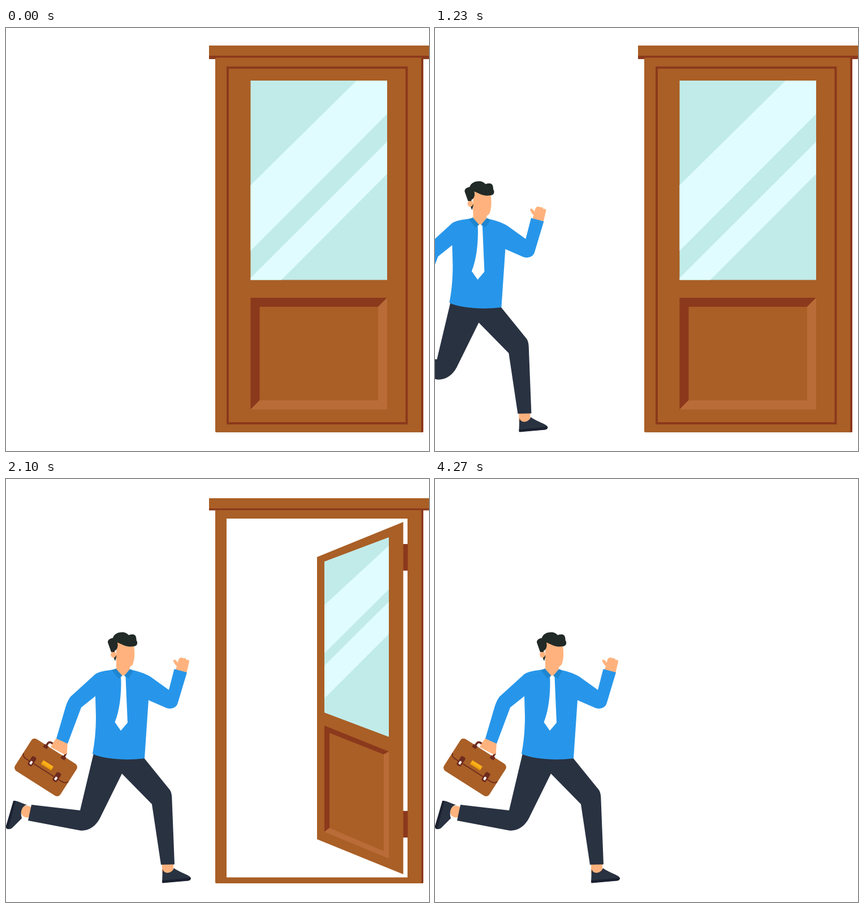
Write an HTML page that moves like this. It is 748 px wide and 748 px high and loops after 4310 ms.

```html
<!DOCTYPE html>
<html lang="en">
<head>
<meta charset="utf-8">
<title>Door to the future</title>
<style>
  html, body { margin: 0; width: 100%; height: 100%; overflow: hidden; background: #fff; }
  svg { display: block; width: 100vw; height: 100vh; }
  .wood { fill: #a95f26; }
  .dark { fill: #8b391c; }
  .light { fill: #b96c38; }
  .glass { fill: #c1ebe9; }
  .shine { fill: #e0fcfe; }
  .blue { fill: #2796ea; }
  .collar { fill: #1f86d0; }
  .skin { fill: #ffb27d; }
  .hair { fill: #212a26; }
  .navy { fill: #293241; }
  .sole { fill: #1b2130; }
  .strap { fill: #6e2b1f; }
  .line { fill: none; stroke: #6e2b1f; }
  text { font: 700 14px "Open Sans", "Noto Sans", sans-serif; fill: #fff; text-anchor: middle; }
</style>
</head>
<body>
<svg viewBox="0 0 748 748">
  <g id="closed">
    <path class="wood" d="M359 31H760V50H359Z"/>
    <path class="dark" d="M359 49H760V55H359Z"/>
    <rect class="wood" x="370" y="52.500" width="368" height="662.500" rx="2"/>
    <path class="dark" d="M734 53H738V713Q738 715 736 715H734Z"/>
    <rect x="392" y="70" width="316.500" height="629" fill="none" stroke="#8b391c" stroke-width="4"/>
    <path class="glass" d="M432.500 93H674V445.500H432.500Z"/>
    <path class="shine" d="M620 93H674V152L432.500 394V278ZM674 201V258L487 445.500H432.500V442Z"/>
    <path class="dark" d="M432.500 477H674L658 493H448.500V658L432.500 674.500Z"/>
    <path class="light" d="M674 477V674.500H432.500L448.500 658.500H658V493Z"/>
  </g>

  <g id="open">
    <path class="wood" d="M359 34H760V53H359Z"/>
    <path class="dark" d="M359 52H760V55.500H359Z"/>
    <path class="wood" fill-rule="evenodd" d="M370 55H738V713Q738 715 736 715H372Q370 715 370 713ZM390 70V704.500H710V70Z"/>
    <path class="dark" d="M734.500 55H738V713Q738 715 736 715H734.500ZM702 115H710.500V162H702ZM702 587H710.500V634H702Z"/>
    <path class="wood" d="M550 138L702.500 76V699L550 637Z"/>
    <path class="glass" d="M563 146L677 103V456L563 413Z"/>
    <path class="shine" d="M677 118V195L563 308V223ZM677 217V274L563 388V330Z"/>
    <path class="dark" d="M563 436L677 482L668 487L572 449V617L563 624Z"/>
    <path class="light" d="M677 482V671L563 624L572 617L668 658V487Z"/>
    <g id="sign">
      <path d="M-27 6L-2 -22L24 5" fill="none" stroke="#a95f26" stroke-width="2"/>
      <circle class="wood" cx="-2" cy="-24" r="8.500"/>
      <path class="wood" d="M-36 4L36 0V33L-36 29Z"/>
      <text y="22.500">FUTURE</text>
    </g>
  </g>

  <g id="man">
    <!-- legs -->
    <circle class="skin" cx="37" cy="588" r="10.500"/>
    <path class="navy" d="M14 569C22 569 28 574 37 576C27 579 25 589 28 600L12 616C7 621 0 620 0 614Z"/>
    <path class="sole" d="M13 569L17 569L4 619C1 619 0 617 0 614Z"/>
    <path class="skin" d="M276 680H296V698H276Z"/>
    <path class="navy" d="M277 689C278 699 293 699 297 688C306 695 318 698 325 703C328 706 326 709 323 710L276 714Z"/>
    <path class="sole" d="M276 710L327 705C327 709 325 710 322 710.500L277 714.500Z"/>
    <path class="navy" d="M155 485L243 492L290 550C293 555 293.500 562 293.500 567L298 681.500L274 682L258 575L205 521L166 600C158 615 145 623 131 621.500L39 604L45 576L131 586Z"/>

    <!-- briefcase and hand -->
    <g transform="translate(70.500 510) rotate(32.500)">
      <path class="line" stroke-width="3.500" d="M-20 -30V-37Q-20 -42 -15 -42H11Q17 -42 17 -37V-30"/>
    </g>
    <path class="skin" d="M91 456L109 465L108 482Q108 487 103 487L79 474Q84 464 91 456Z"/>
    <g transform="translate(70.500 510) rotate(32.500)">
      <rect class="wood" x="-47.500" y="-33.500" width="95" height="67" rx="7"/>
      <path class="line" stroke-width="1.800" d="M-47 0Q-45 6 -37 6H37Q45 6 47 0"/>
      <path class="strap" d="M-24 -34H-16V-28H-24ZM13 -34H21V-28H13Z"/>
      <rect x="-10.500" y="-8.500" width="21" height="8" fill="#fbaf17"/>
      <path d="M-10.500 -3H10.500V-.5H-10.500Z" fill="#e49a0c"/>
      <g id="buckle">
        <rect class="strap" x="-31" y="-5" width="9" height="18" rx="3"/>
        <rect x="-28.500" y="4" width="4" height="6" rx="1" fill="#fff"/>
      </g>
      <use href="#buckle" x="52"/>
    </g>

    <!-- raised hand, shirt, tie -->
    <path class="skin" d="M299 340L302 331C298 327 295 322 296 320C299 318 302 322 304 325C304 321 306 316 309 316C312 315 313 317 314 317C317 316 319 318 319 320C323 319 325 321 323.500 325L319 344Z"/>
    <path class="blue" d="M190 337C176 339 166 340 158 345L114 385C110 390 108 396 106 401L89 459L109 468L133 404L158 384L159 420C159 450 156 470 153 486C175 496 215 498 245 494L252 391L284 405C293 408 301 404 303.500 397L320 342L297.500 336L288 373L256 350C245 343 232 340 221 337Z"/>
    <path class="collar" d="M187 338L195 335L207 348L199 353ZM220 336L225 340L217 353L209 347Z"/>
    <path class="skin" d="M195 300H219V336L207.500 350L195 336Z"/>
    <path fill="#fff" d="M203 350L207.500 346.500L211.500 350L215 431L203 445L192.500 430C201 410 204 380 203.500 355Z"/>

    <!-- head -->
    <path class="hair" d="M189 312H196L193 322Z"/>
    <path class="skin" d="M196 288H225C228 304 228 318 224 328C220 335 207 335 195 325Z"/>
    <ellipse class="skin" cx="190" cy="310.500" rx="4.800" ry="5.500"/>
    <path class="hair" d="M180 289C180 284 184 282 189 281C191 274 198 271 205 271C211 271 214 273 217 276C223 274 229 274 230 280C231 283 230 284 231 286C234 291 231 296 225 296C214 298 206 293 197 289C199 297 196 302 192 304L192 306L186 306Z"/>
  </g>
</svg>
<script>
  const LOOP = 4310, FRAME = 100 / 3;
  const MAN_STOP = 2100, DOOR_OPENS = 2000, DOOR_GONE = 4260;
  const SIGN_START = 3000, SIGN_END = 4033;
  const [closed, open, sign, man] = ["closed", "open", "sign", "man"]
    .map(id => document.getElementById(id));

  // sine ease between two times
  function ease(t, from, to) {
    const u = Math.min(1, Math.max(0, (t - from) / (to - from)));
    return (1 - Math.cos(Math.PI * u)) / 2;
  }

  function show(node, on) {
    node.setAttribute("display", on ? "inline" : "none");
  }

  function draw(ms) {
    const t = Math.min(128, Math.floor((ms + 4) / FRAME)) * FRAME;
    const isOpen = t > DOOR_OPENS - 1;
    const size = ease(t, SIGN_START, SIGN_END);
    show(closed, !isOpen);
    show(open, isOpen && t < DOOR_GONE);
    show(sign, size > 0);
    sign.setAttribute("transform", `translate(620.5 257) scale(${size})`);
    man.setAttribute("transform", `translate(${350 * (ease(t, 0, MAN_STOP) - 1)} 0)`);
  }

  const start = performance.now();
  function tick() {
    draw((performance.now() - start) % LOOP);
    requestAnimationFrame(tick);
  }
  tick();
</script>
</body>
</html>
```
